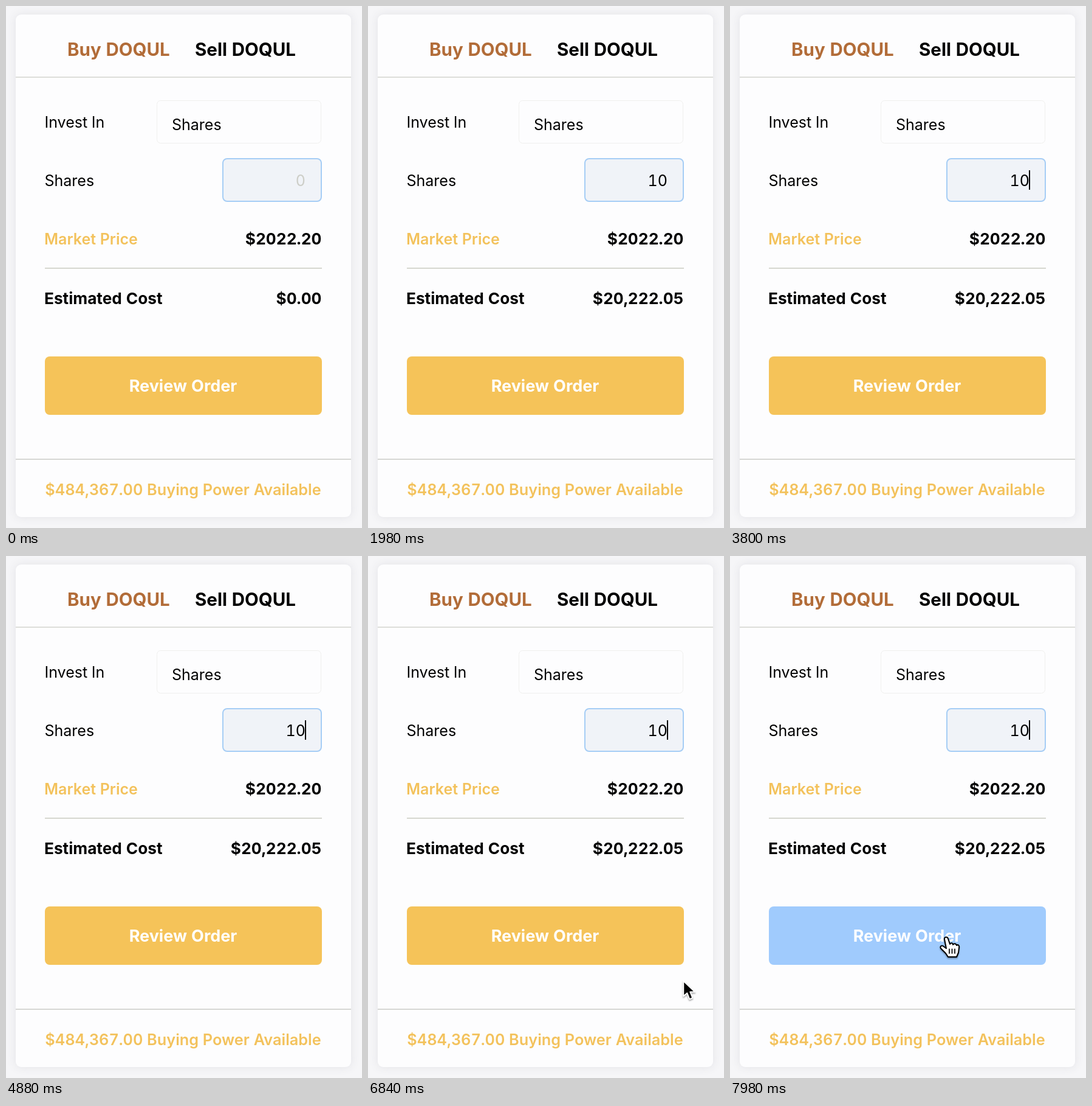
Write an HTML page that moves like this. It is 586 by 858 pixels and loops after 8000 ms.

```html
<!DOCTYPE html>
<html lang="en">
<head>
<meta charset="utf-8">
<title>Order form</title>
<style>
  html, body { margin: 0; width: 100%; height: 100%; overflow: hidden; background: #f6f6f8; }
  svg { display: block; width: 586px; height: 858px; }
  text { font: 25px Inter, "Noto Sans", sans-serif; font-variant-numeric: tabular-nums; fill: #000; }
  .tab { font-size: 29.5px; font-weight: 700; }
  .strong { font-size: 26.2px; font-weight: 700; }
  .gold { font-weight: 600; fill: #f3c25c; }
  .footer { font-size: 25.3px; }
  .action { font-size: 27px; font-weight: 700; fill: #fff; }
  .end { text-anchor: end; }
  .mid { text-anchor: middle; }
  .card { fill: #fdfdfe; filter: drop-shadow(0 0 7px #e2e2e6); }
  .pointer { filter: drop-shadow(0 2px 1px #0005); }
</style>
</head>
<body>
<svg viewBox="0 0 586 858">
  <rect class="card" x="16" y="14" width="552" height="826" rx="9"/>
  <path d="M16 117H568" stroke="#dddeda" stroke-width="2"/>
  <path d="M64 431H520" stroke="#d6d7d0" stroke-width="2"/>
  <path d="M16 745H568" stroke="#d6d7d4" stroke-width="2"/>

  <text class="tab" x="101" y="82" style="fill:#b26c38">Buy DOQUL</text>
  <text class="tab" x="311" y="82">Sell DOQUL</text>

  <text x="63.5" y="200">Invest In</text>
  <rect x="248.5" y="155.500" width="270" height="70" rx="6" fill="none" stroke="#f0f0ee"/>
  <text x="273" y="204">Shares</text>

  <text x="63.5" y="296">Shares</text>
  <rect x="357" y="251" width="162" height="70" rx="7" fill="#f0f3f8" stroke="#a6cdf5" stroke-width="2"/>
  <text id="shares" class="end" x="493" y="296"></text>
  <path id="caret" d="M493 270V302" stroke="#000" stroke-width="2"/>

  <text class="gold" x="63" y="392">Market Price</text>
  <text class="strong end" x="519.5" y="392">$2022.20</text>
  <text class="strong" x="63" y="490">Estimated Cost</text>
  <text id="cost" class="strong end" x="519.5" y="490"></text>

  <rect id="button" x="64" y="576" width="456" height="96" rx="8"/>
  <text class="action mid" x="291.5" y="634">Review Order</text>
  <text class="gold footer mid" x="291.5" y="804">$484,367.00 Buying Power Available</text>

  <g id="pointer" class="pointer" fill="#fff" stroke="#000" stroke-width="2" stroke-linejoin="round" stroke-linecap="round">
    <g id="hand">
      <path d="M-3 3C-4-1 2-2 3 2L6 11C8 8 11 9 11 12C13 9 16 10 17 13C19 11 22 13 21 17L20 25L17 32H3L-1 26L-9 18C-11 14-7 12-4 15L0 18Z"/>
      <path d="M5 19V26M9.5 19V26M14 19V26" stroke-width="1.7"/>
    </g>
    <path id="arrow" d="M0 0V25L6 20L10 30L15 28L11 18H19Z" fill="#000" stroke="#fff"/>
  </g>
</svg>
<script>
const LOOP = 8000, PRICE = 2022.2049, BLINK = 1120;
const FIRST_KEY = 840, SECOND_KEY = 1060, CARET_START = 400, POINTER_START = 6480;
// time, x, y of the pointer tip
const path = [
  [6480, 588, 832], [6720, 560, 715], [7080, 405, 652],
  [7280, 405, 652], [7720, 356, 627], [8000, 356, 627]
];
const el = id => document.getElementById(id);
const show = (id, on) => el(id).setAttribute("visibility", on ? "visible" : "hidden");

function pointerAt(t) {
  const i = Math.max(1, path.findIndex(p => p[0] > t));
  const [t0, x0, y0] = path[i - 1], [t1, x1, y1] = path[i];
  const u = Math.max(0, (t - t0) / (t1 - t0));
  const k = u * u * (3 - 2 * u);
  return [x0 + (x1 - x0) * k, y0 + (y1 - y0) * k];
}

function caretOn(t) {
  if (t < CARET_START) return false;
  return t < SECOND_KEY || (t - SECOND_KEY) % BLINK < BLINK / 2;
}

function draw() {
  const t = performance.now() % LOOP;
  const count = t < FIRST_KEY ? 0 : t < SECOND_KEY ? 1 : 10;
  el("shares").textContent = count;
  el("shares").style.fill = count ? "#000" : "#cdcec8";
  el("cost").textContent = "$" + (PRICE * count).toLocaleString("en-US",
    { minimumFractionDigits: 2, maximumFractionDigits: 2 });
  show("caret", caretOn(t));

  const [x, y] = pointerAt(t), visible = t >= POINTER_START;
  const hover = visible && x > 64 && x < 520 && y > 576 && y < 672;
  el("pointer").setAttribute("transform", `translate(${x} ${y})`);
  show("hand", hover);
  show("arrow", visible && !hover);
  el("button").setAttribute("fill", hover ? "#a0cbfd" : "#f5c359");
  requestAnimationFrame(draw);
}
draw();
</script>
</body>
</html>
```
